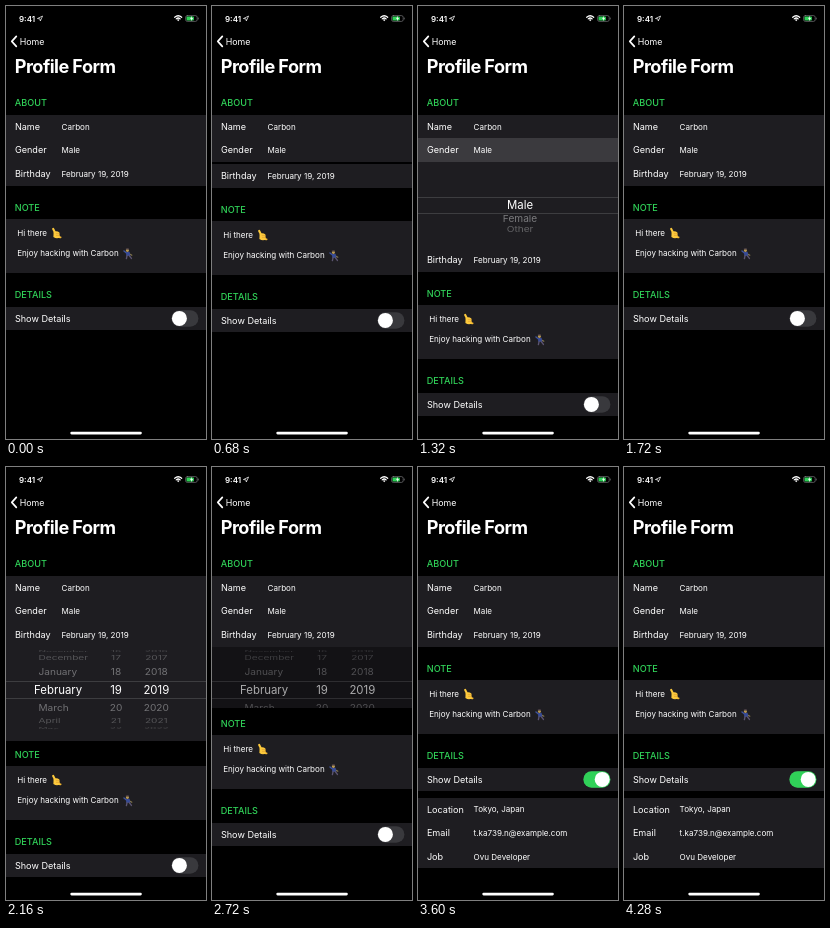
Animation of 200 by 433 pixels, one loop 4320 ms. Source, as an HTML page with a canvas:

```html
<!DOCTYPE html>
<html lang="en">
<head>
<meta charset="utf-8">
<title>Profile Form</title>
<style>
  html, body { margin: 0; width: 100%; height: 100%; overflow: hidden; background: #000; }
  canvas { display: block; width: 200px; height: 433px; }
</style>
</head>
<body>
<canvas></canvas>
<script>
const LOOP = 4320, ROW = 23.6, PICKER = 86.4, FOOTER = 8.5;
const CELL = '#1e1d21', PRESSED = '#3b3a3e', GREEN = '#30d158', WHITE = '#fff';
const canvas = document.querySelector('canvas');
const ctx = canvas.getContext('2d');
const dpr = window.devicePixelRatio || 1;
canvas.width = 200 * dpr;
canvas.height = 433 * dpr;

const clamp = v => Math.min(1, Math.max(0, v));
const mix = (a, b, p) => a + (b - a) * p;
const during = (t, from, to) => t >= from && t < to;

function ease(t, start, duration) {
  const p = clamp((t - start) / duration);
  return p * p * (3 - 2 * p);
}

function rect(x, y, w, h, color) {
  ctx.fillStyle = color;
  ctx.fillRect(x, y, w, h);
}

// Full-width band snapped to whole pixels, so neighbours leave no seam
function band(y, h, color) {
  const top = Math.round(y);
  rect(0, top, 200, Math.round(y + h) - top, color);
}

function pill(x, y, w, h, r, color) {
  ctx.fillStyle = color;
  ctx.beginPath();
  ctx.roundRect(x, y, w, h, r);
  ctx.fill();
}

function stroke(path, color, width) {
  ctx.strokeStyle = color;
  ctx.lineWidth = width;
  ctx.lineCap = ctx.lineJoin = 'round';
  ctx.stroke(new Path2D(path));
}

function shape(path, color) {
  ctx.fillStyle = color;
  ctx.fill(new Path2D(path));
}

// y is the middle of the capital letters
function text(str, x, y, size, { color = WHITE, weight = 400, align = 'left', spacing = 0 } = {}) {
  ctx.font = `${weight} ${size}px Inter, Roboto, sans-serif`;
  ctx.letterSpacing = spacing + 'px';
  ctx.textAlign = align;
  ctx.fillStyle = color;
  ctx.fillText(str, x, y + size * 0.364);
}

function faded(alpha, draw) {
  if (alpha <= 0) return;
  ctx.save();
  ctx.globalAlpha = alpha;
  draw();
  ctx.restore();
}

function shifted(dy, draw) {
  ctx.save();
  ctx.translate(0, Math.round(dy));
  draw();
  ctx.restore();
}

function row(label, value, y, pressed) {
  band(y, ROW, pressed ? PRESSED : CELL);
  text(label, 8.9, y + ROW / 2, 9.1);
  text(value, 55.6, y + ROW / 2 + 0.2, 8.05);
}

const header = (label, y) => text(label, 8.8, y, 9.1, { color: GREEN, weight: 500 });

function statusBar() {
  text('9:41', 13, 12.8, 8, { weight: 600 });
  stroke('M36.4 10.4 L34.3 15 L34 12.9 L31.8 12.6 Z', WHITE, 0.7);
  stroke('M168.7 11.3 Q172.2 8.2 175.7 11.3 M170.2 12.9 Q172.2 11.1 174.2 12.9', WHITE, 1.2);
  shape('M170.9 13.8 Q172.2 12.8 173.5 13.8 L172.2 15.3 Z', WHITE);
  ctx.strokeStyle = '#8a8a8d';
  ctx.lineWidth = 0.6;
  ctx.beginPath();
  ctx.roundRect(179.6, 9.6, 11.6, 5.8, 1.7);
  ctx.stroke();
  pill(180.5, 10.5, 7.4, 4, 0.9, GREEN);
  rect(191.9, 11.6, 0.6, 1.8, '#8a8a8d');
  shape('M186 9.8 L184 12.7 H185.3 L184.9 15.2 L187 12.1 H185.6 Z', WHITE);
}

function navigation() {
  stroke('M10.3 30.4 L5.8 35.4 L10.3 40.4', WHITE, 1.7);
  text('Home', 13.8, 35.4, 8.8);
  text('Profile Form', 8.8, 60.2, 18.1, { weight: 700, spacing: -0.55 });
}

function handIcon() {
  stroke('M47.2 222.9 L49.4 227.2', '#fcc93c', 2.1);
  stroke('M52.6 231 L54.6 231.4', '#f7b92f', 1.8);
  shape('M47.6 226 Q50.6 224.4 53.4 226.4 L53.8 231.6 Q50.4 233.2 47.4 231 Z', '#fcc93c');
  stroke('M50.2 227.6 H53.2 M50.4 229.4 H53.4', '#d9912b', 0.5);
}

function personIcon() {
  stroke('M120.5 247 L118 245', '#40549c', 1.5);
  stroke('M122.8 247.4 L125.8 249.2', '#8a7a4a', 1.2);
  shape('M119.7 246 L123.6 245.8 L124.4 249.8 L120.4 250 Z', '#384b94');
  stroke('M121 249.8 L120.4 252.6 M123.4 249.8 L125.4 252.4', '#5b5470', 1.4);
  pill(119.9, 242.6, 3, 3.4, 1.4, '#b99a55');
  rect(119.8, 242.3, 3.2, 1.2, '#3b3140');
}

// Wheel rows sit on a cylinder of radius 39
function wheel(items, x, y, step, align) {
  const middle = items.length >> 1;
  items.forEach((item, i) => {
    const angle = (i - middle) * step, far = i !== middle;
    ctx.save();
    ctx.translate(far && align === 'left' ? x + 4.5 : x, y + 39 * Math.sin(angle));
    ctx.scale(1, Math.cos(angle));
    const gray = 150 - 80 * Math.abs(Math.sin(angle));
    text(item, 0, 0, far ? 10.1 : 11.4, {
      align, color: far ? `rgb(${gray},${gray},${gray + 3})` : WHITE
    });
    ctx.restore();
  });
}

// The cell reaches under whatever follows it by the section footer
function picker(y, open, halfBand, drawWheels) {
  if (open <= 0) return;
  ctx.save();
  ctx.beginPath();
  ctx.rect(0, Math.round(y), 200, (PICKER + FOOTER) * open);
  ctx.clip();
  ctx.globalAlpha = open;
  band(y, PICKER + FOOTER, CELL);
  const center = y + PICKER / 2;
  drawWheels(center);
  for (const side of [-1, 1]) band(center + side * halfBand - 0.3, 1, '#3d3d40');
  ctx.restore();
}

const range = from => Array.from({ length: 7 }, (_, i) => String(from + i));
const months = ['November', 'December', 'January', 'February', 'March', 'April', 'May'];

const genderWheel = y => wheel(['', '', 'Male', 'Female', 'Other'], 102, y, 0.34, 'center');

function dateWheel(y) {
  wheel(months, 28, y, 0.47, 'left');
  wheel(range(16), 110, y, 0.47, 'center');
  wheel(range(2016), 150.3, y, 0.47, 'center');
}

function toggle(on, pressed) {
  pill(165.4, 304.2, 27, 16.5, 8.2, '#39393d');
  faded(on, () => pill(165.4, 304.2, 27, 16.5, 8.2, GREEN));
  const width = pressed ? 17.5 : 15;
  pill(mix(165.9, 191.7 - width, on), 304.9, width, 15, 7.5, WHITE);
}

function details(shown) {
  const rows = [
    ['Location', 'Tokyo, Japan'],
    ['Email', 't.ka739.n@example.com'],
    ['Job', 'Ovu Developer']
  ];
  faded(shown, () => rows.forEach(([label, value], i) => row(label, value, 330.5 + i * ROW)));
}

function draw(t) {
  const gender = ease(t, 658, 240) - ease(t, 1322, 250);
  const birthday = ease(t, 1950, 210) - ease(t, 2620, 250);

  ctx.setTransform(dpr, 0, 0, dpr, 0, 0);
  rect(0, 0, 200, 433, '#000');
  statusBar();
  navigation();

  header('ABOUT', 96.6);
  row('Name', 'Carbon', 108.7);
  row('Gender', 'Male', 108.7 + ROW, during(t, 440, 655) || during(t, 1200, 1345));
  picker(108.7 + 2 * ROW, gender, 7.8, genderWheel);

  shifted(PICKER * gender, () => {
    row('Birthday', 'February 19, 2019', 108.7 + 2 * ROW,
      during(t, 1820, 1960) || during(t, 2500, 2640));
    picker(108.7 + 3 * ROW, birthday, 8.7, dateWheel);
  });

  shifted(PICKER * (gender + birthday), () => {
    header('NOTE', 201.2);
    band(213, 53.5, CELL);
    text('Hi there', 11.2, 227.2, 8.05);
    handIcon();
    text('Enjoy hacking with Carbon', 11.2, 247.4, 8.05);
    personIcon();
    header('DETAILS', 288.8);
    row('Show Details', '', 300.7);
    toggle(ease(t, 3290, 230), during(t, 3200, 3340));
    details(ease(t, 3320, 260));
  });

  pill(64.3, 425.8, 71.5, 2.6, 1.3, WHITE);
}

function frame() {
  draw(performance.now() % LOOP);
  requestAnimationFrame(frame);
}
frame();
</script>
</body>
</html>
```
